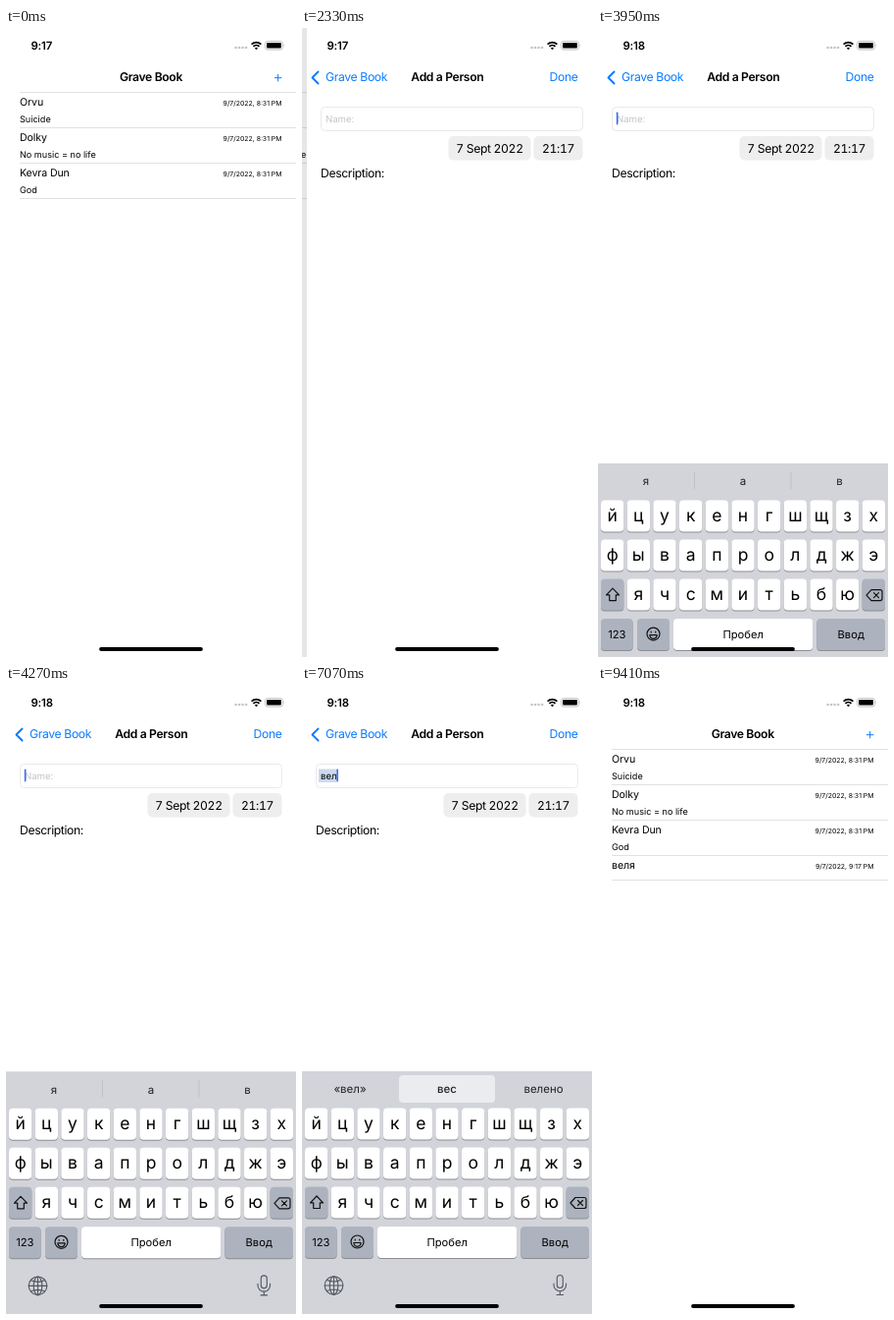
Animation of 296x640 px, one loop 9.51 s. Source, as an HTML page:

```html
<!DOCTYPE html>
<html lang="en">
<head>
<meta charset="utf-8">
<title>Add a Person</title>
<style>
html, body { margin: 0; height: 100%; overflow: hidden; background: #fff; }
svg { display: block; width: 100vw; height: 100vh; }
text { font-family: Inter, Roboto, sans-serif; white-space: pre; text-rendering: geometricPrecision; }
.body { font-size: 12.2px; letter-spacing: -.03em; }
.bold { font-weight: 600; }
.mid { text-anchor: middle; }
.end { text-anchor: end; }
.blue { fill: #0a7aff; }
.name { font-size: 10.6px; letter-spacing: -.01em; }
.small { font-size: 9.1px; }
.date { font-size: 6.9px; }
.field { font-size: 9.6px; }
.letter { font-size: 17.5px; }
.label { font-size: 11.2px; }
.word { font-size: 11.5px; fill: #222; }
.chip { fill: #eeeeef; }
.rule { stroke: #e2e2e2; }
.line { fill: none; stroke-linecap: round; stroke-linejoin: round; }
.tab { font-variant-numeric: tabular-nums; }
</style>
</head>
<body>
<svg viewBox="0 0 296 640">
  <rect width="296" height="640" fill="#fff"/>
  <g id="list"></g>
  <rect id="dim" width="296" height="640"/>

  <g id="page">
    <rect width="296" height="640" fill="#fff"/>
    <rect x="14.5" y="80.5" width="267" height="24" rx="4" fill="#fff" stroke="#e9e9e9"/>
    <text id="hint" class="field" x="19" y="95.7" fill="#c5c5c8">Name:</text>
    <rect id="mark" x="17" y="85.5" height="13.5" fill="#cbd9f0"/>
    <text id="typed" class="field" x="19" y="95.7"></text>
    <rect id="caret" y="85.5" width="1.6" height="13" rx=".8" fill="#3a6cf0"/>
    <rect class="chip" x="144.5" y="110" width="84" height="24.5" rx="5"/>
    <text class="body mid tab" x="186.5" y="126.6">7 Sept 2022</text>
    <rect class="chip" x="231.5" y="110" width="50" height="24.5" rx="5"/>
    <text class="body mid tab" x="256.5" y="126.6">21:17</text>
    <text class="body" x="14" y="152">Description:</text>
    <g id="keyboard">
      <rect width="296" height="250" fill="#d2d4da"/>
      <rect id="pick" x="99" y="4" width="98" height="28" rx="4" fill="#ebecef"/>
      <path id="bars" d="M98.5 9v17M197 9v17" stroke="#bfc1c7"/>
      <g id="words">
        <text class="word mid" x="49" y="22.2"></text>
        <text class="word mid" x="148" y="22.2"></text>
        <text class="word mid" x="246.5" y="22.2"></text>
      </g>
      <g id="keys"></g>
      <g class="line" stroke="#111" stroke-width="1.2">
        <path d="M15 127l6.5 6.8h-3.2v5.7h-6.6v-5.7h-3.2z"/>
        <path d="M279 128.5h9q2 0 2 2v7q0 2-2 2h-9l-5-5.5zM281.5 131.5l5 5m0-5l-5 5"/>
        <circle cx="56.5" cy="173.5" r="6.5"/>
        <path d="M54.2 171v1M58.8 171v1"/>
        <path d="M52.8 174.5h7.4q-.6 3.8-3.7 3.8t-3.7-3.8z"/>
      </g>
      <g class="line" stroke="#53565c" stroke-width="1.1">
        <circle cx="32.5" cy="218" r="9.3"/>
        <ellipse cx="32.5" cy="218" rx="4.3" ry="9.3"/>
        <path d="M32.5 208.7v18.6M23.2 218h18.6M25.5 212.5q7 3 14 0M25.5 223.5q7-3 14 0"/>
        <rect x="260.3" y="207.5" width="6" height="13" rx="3"/>
        <path d="M257 216v1.5a6.3 6.3 0 0 0 12.6 0V216M263.3 224v3.5M260 227.5h6.6"/>
      </g>
    </g>
  </g>

  <text id="title" class="body bold mid" x="148" y="54.4">Grave Book</text>
  <path id="plus" d="M274 50.7h7.4M277.7 47v7.4" stroke="#0a7aff" stroke-width="1"/>
  <g id="nav">
    <path class="line" d="M16.5 44.5l-6 6 6 6" stroke="#0a7aff" stroke-width="1.9"/>
    <text id="back" class="body blue" x="24" y="54.4">Grave Book</text>
    <text id="heading" class="body bold mid" x="148.3" y="54.4">Add a Person</text>
    <text id="done" class="body blue end" x="281.5" y="54.4">Done</text>
  </g>

  <text id="clock" class="bold" x="25.5" y="22" font-size="11.4" letter-spacing="-.2"></text>
  <g fill="#c6c6c6">
    <circle cx="234.6" cy="20" r="1.35"/><circle cx="238.1" cy="20" r="1.35"/>
    <circle cx="241.6" cy="20" r="1.35"/><circle cx="245.1" cy="20" r="1.35"/>
  </g>
  <path d="M250.6 16.6a7.2 7.2 0 0 1 9.8 0M252.5 18.8a4.4 4.4 0 0 1 6 0" fill="none" stroke="#000" stroke-width="1.8"/>
  <path d="M253.9 20.5a2.3 2.3 0 0 1 3.2 0l-1.6 1.7z"/>
  <rect x="264.5" y="13.5" width="18" height="8.5" rx="2.6" fill="none" stroke="#b0b0b0" stroke-width=".8"/>
  <rect x="266" y="15" width="15" height="5.5" rx="1.3"/>
  <path d="M283.6 16.3q1.4 1.4 0 3z" fill="#b0b0b0"/>
  <rect x="95.1" y="629.9" width="105.8" height="4" rx="2"/>
</svg>
<script>
const LOOP = 9510, W = 296;
const $ = id => document.getElementById(id);
const set = (id, attrs) => {
  for (const k in attrs) $(id).setAttribute(k, attrs[k]);
};
const shift = (id, x, y = 0) => set(id, { transform: `translate(${x} ${y})` });
const text = (cls, x, y, s) => `<text class="${cls}" x="${x}" y="${y}">${s}</text>`;
const rule = y => `<path class="rule" d="M14 ${y}H${W}"/>`;

// List of people
const people = [
  ['Orvu', 'Suicide', '8:31'],
  ['Dolky', 'No music = no life', '8:31'],
  ['Kevra Dun', 'God', '8:31'],
  ['веля', '', '9:17']
];
$('list').innerHTML = rule(65.5) + people.map(([name, note, time], i) => {
  const y = 65.5 + 36 * i;
  return `<g id="row${i}">` + text('name', 14, y + 13.2, name) +
    text('small', 14, y + 30.2, note) +
    text('date end', 281.5, y + 13.6, `9/7/2022, ${time} PM`) +
    rule(y + (note ? 36 : 25)) + '</g>';
}).join('');

// Keyboard keys
const key = (x, y, w, s, cls, dark) =>
  `<rect x="${x}" y="${y + 1}" width="${w}" height="32" rx="4" fill="#8b8d93"/>` +
  `<rect x="${x}" y="${y}" width="${w}" height="32" rx="4" fill="${dark ? '#adb3be' : '#fff'}"/>` +
  text(cls + ' mid', x + w / 2, y + (cls === 'letter' ? 21 : 19.7), s);
$('keys').innerHTML =
  ['йцукенгшщзх', 'фывапролджэ', ' ячсмитьбю '].map((row, r) =>
    [...row].map((c, i) =>
      key(3 + 26.67 * i, 37.5 + 40 * r, 23.3, c, 'letter', c === ' ')).join('')).join('') +
  key(3, 158, 32.6, '123', 'label', true) +
  key(40, 158, 33, '', 'label', true) +
  key(77, 158, 142.3, 'Пробел', 'label') +
  key(223.3, 158, 69.7, 'Ввод', 'label', true);

const ticks = [
  [0, 0, 1], [1740, 1740, 1], [2000, 2440, 5], [2720, 2720, 1], [3110, 3110, 1],
  [3600, 3600, 1], [3730, 4380, 7], [4660, 4780, 2], [5320, 5560, 3], [5770, 6100, 4],
  [6250, 6480, 3], [6620, 7070, 5], [7220, 8070, 8], [8190, 8190, 1], [8410, 8410, 1],
  [8610, 8610, 1], [8850, 9410, 6]
].flatMap(([a, b, n]) =>
  Array.from({ length: n }, (_, i) => Math.floor(a + (b - a) * i / Math.max(1, n - 1))));

// Value of the last [time, ...] entry reached
const at = (track, t) => track.filter(e => e[0] <= t).pop();

const typing = [[0, ''], [5320, 'в'], [5770, 'ве'], [6250, 'вел'], [7220, 'веля']];
const hints = [
  [0, 'я', 'а', 'в'], [5440, '«в»', '', ''], [5770, '«ве»', 'все', 'век'],
  [6250, '«вел»', 'вес', 'велено'], [6620, '«вел»', 'вес', 'велено'],
  [7220, '«веля»', 'велями', 'велях']
];
const caret = [
  [0, 0], [3110, 1], [4660, .5], [4780, 0], [5320, 1], [6100, 0], [6620, 1],
  [8070, 0], [8190, .5], [8410, 1], [8610, .5], [8850, 0]
];

// Critically damped spring: 1 at rest, falling to 0
const spring = ms => {
  const u = Math.max(0, ms) * .01826;
  return (1 + u) * Math.exp(-u);
};

function draw(now) {
  const t = ticks.filter(k => k <= now).pop();
  const away = t < 8850 ? spring(t - 1995) : 1 - spring(t - 8930);
  const x = Math.round(W * away), shown = 1 - away;

  shift('page', x);
  shift('list', -.3 * (W - x));
  set('dim', { opacity: .1 * shown, width: x });
  set('row3', { visibility: t < 8000 ? 'hidden' : 'visible' });

  // The bar's labels settle sooner than the page
  const slide = away ** 2;
  shift('title', -93 * (1 - slide));
  set('title', { opacity: slide });
  set('plus', { opacity: slide * (t >= 1740 && t < 8850 ? .3 : 1) });
  set('nav', { opacity: shown });
  shift('back', 92 * slide);
  shift('heading', 148 * slide);
  set('done', { opacity: t < 8610 ? 1 : .25 });
  $('clock').textContent = t < 3600 ? '9:17' : '9:18';

  const value = at(typing, t)[1], marked = t >= 6620 && t < 7220;
  $('typed').textContent = value;
  set('hint', { visibility: value ? 'hidden' : 'inherit' });
  const end = 19 + (value ? $('typed').getComputedTextLength() : 0);
  set('caret', { x: end - .2, opacity: at(caret, t)[1] });
  set('mark', { width: end - 17, opacity: marked ? 1 : 0 });

  shift('keyboard', 0, 393 + 247 * spring(t - 3783));
  const [since, ...words] = at(hints, t);
  const fade = since ? Math.min(1, (t - since) / 240) : 1;
  [...$('words').children].forEach((w, i) => {
    w.textContent = words[i];
    w.style.fontWeight = marked && i === 1 ? 500 : 400;
  });
  set('words', { opacity: fade });
  set('pick', { opacity: marked ? fade : 0 });
  set('bars', { opacity: marked ? 1 - fade : 1 });
}

const start = performance.now();
function frame() {
  draw((performance.now() - start) % LOOP);
  requestAnimationFrame(frame);
}
frame();
</script>
</body>
</html>
```
